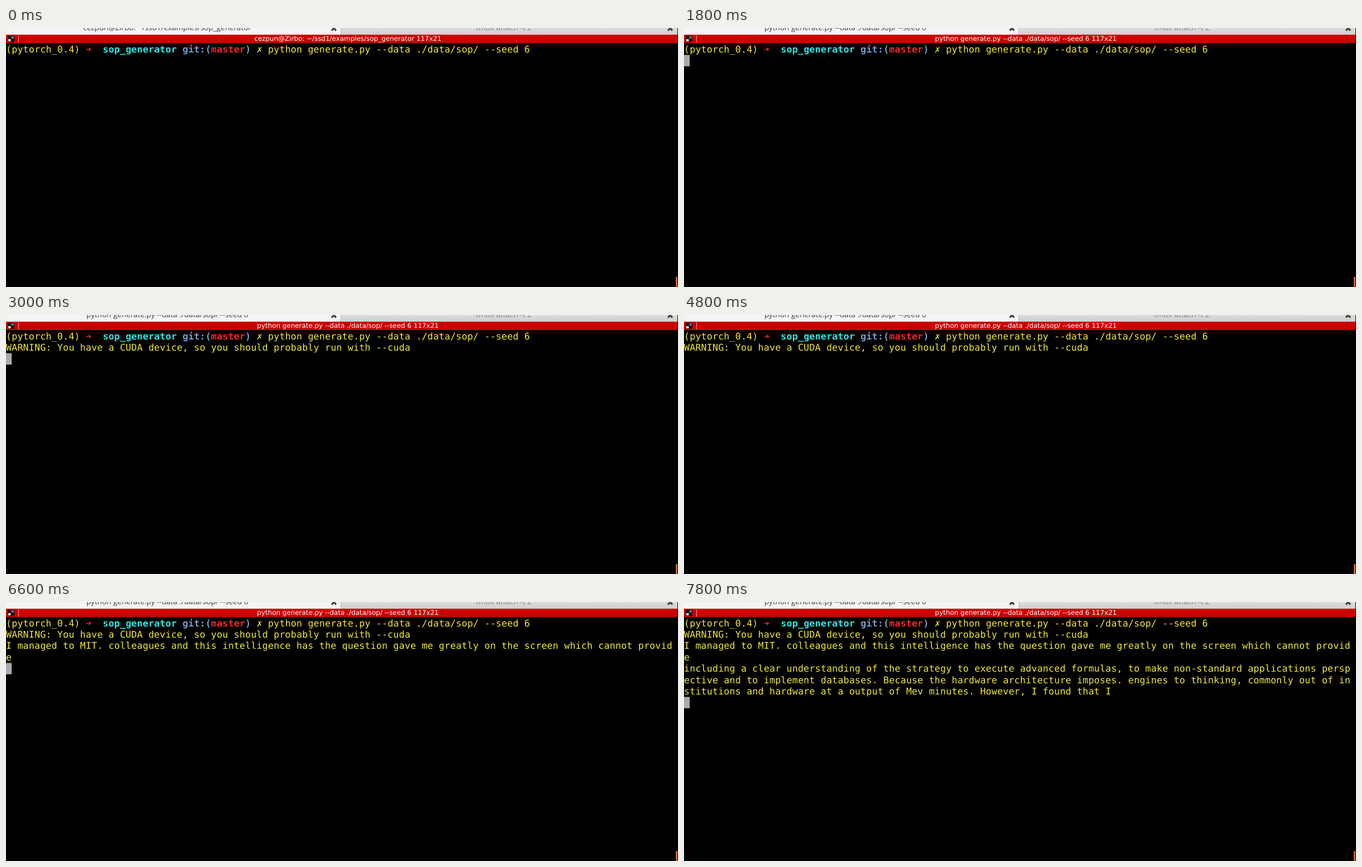
Recreate the animation shown at these times as an HTML page. Size 1203 by 465 pixels, loop 8 s.

```html
<!DOCTYPE html>
<html lang="en">
<head>
<meta charset="utf-8">
<title>Terminal session</title>
<style>
  html, body { margin: 0; width: 100%; height: 100%; overflow: hidden; background: #000; }
  svg { display: block; width: 1203px; height: 465px; }
  text { white-space: pre; text-rendering: geometricPrecision; }
  .ui { text-anchor: middle; }
  .tab { font-family: "Open Sans", sans-serif; font-size: 13.55px; }
  .title { font-family: "DejaVu Sans", sans-serif; font-size: 11.92px; fill: #fff; }
  .term {
    font-family: "DejaVu Sans Mono", monospace; font-size: 16.69px;
    letter-spacing: .149px; fill: #f0e83a;
  }
  .bold { font-weight: bold; }
</style>
</head>
<body>
<svg viewBox="0 0 1203 465" xmlns="http://www.w3.org/2000/svg">
  <defs>
    <linearGradient id="idle" x2="0" y2="1">
      <stop stop-color="#dcdcdc"/><stop offset="1" stop-color="#d0d0d0"/>
    </linearGradient>
    <path id="close" d="M-4-4 4 4M4-4-4 4" stroke="#444" stroke-width="3.4"/>
  </defs>
  <rect width="1203" height="465"/>

  <rect width="600" height="12" fill="#f5f4f4"/>
  <rect x="600" width="602" height="12" fill="url(#idle)"/>
  <rect x="599" width="1" height="12" fill="#b4b4b4"/>
  <text id="tab" class="ui tab" x="288.7" y="4" fill="#3c3c3c"></text>
  <text class="ui tab" x="891" y="4" fill="#858585">tmux attach -t 2</text>
  <use href="#close" x="587" y="0.5"/>
  <use href="#close" x="1189" y="0.5"/>

  <rect y="12" width="1202" height="15" fill="#c00"/>
  <rect x="3" y="14" width="12" height="11" fill="#1c1414"/>
  <rect x="9.5" y="15" width="4.5" height="4" fill="#2f7fa8"/>
  <rect x="4" y="20" width="4.5" height="4" fill="#e4e0e0"/>
  <rect x="22" y="13" width="1" height="13" fill="#eba0a0"/>
  <text id="title" class="ui title" x="612" y="23.2"></text>

  <g id="screen"></g>
  <rect id="cursor" width="10.2" height="20.35" fill="#aaa"/>
  <rect x="1199" y="447" width="3" height="18" fill="#d4643c"/>
</svg>
<script>
const LOOP = 8000, COL = 10.197, ROW = 20.35, TOP = 28, ASCENT = 15.76;
const $ = id => document.getElementById(id);
const COMMAND = 'python generate.py --data ./data/sop/ --seed 6';
const SHELL = 'cezpun@Zirbo: ~/ssd1/examples/sop_generator';

// Prompt pieces: column, text, colour, bold
const prompt = [
  [0, '(pytorch_0.4)'],
  [14, '➜', '#ef2929', true],
  [17, 'sop_generator', '#34e2e2', true],
  [31, 'git:(', '#729fcf', true],
  [36, 'master', '#ef2929', true],
  [42, ')', '#729fcf', true],
  [44, '✗'],
  [46, COMMAND]
];

// Printed output: time, first row, lines
const output = [
  [2200, 1, ['WARNING: You have a CUDA device, so you should probably run with --cuda']],
  [5400, 2, [
    'I managed to MIT. colleagues and this intelligence has the question gave me greatly on the screen which cannot provid',
    'e'
  ]],
  [6900, 4, [
    'including a clear understanding of the strategy to execute advanced formulas, to make non-standard applications persp',
    'ective and to implement databases. Because the hardware architecture imposes. engines to thinking, commonly out of in',
    'stitutions and hardware at a output of Mev minutes. However, I found that I'
  ]]
];

// Cursor positions: time, column, row
const moves = [[0, 92, 0], [1800, 0, 1], [2200, 0, 2], [5400, 0, 4], [6900, 0, 7]];
// Cursor visibility: time, shown
const blinks = [
  [0, 0], [300, 1], [900, 0], [1500, 1], [2300, 0], [3000, 1], [3500, 0],
  [4100, 1], [4800, 0], [5400, 1], [6200, 0], [6600, 1], [7300, 0], [7800, 1]
];

const latest = (list, t) => list.filter(item => item[0] <= t).pop();

function write(parent, col, row, string, fill, bold) {
  const el = document.createElementNS('http://www.w3.org/2000/svg', 'text');
  el.setAttribute('class', bold ? 'term bold' : 'term');
  el.setAttribute('x', col * COL);
  el.setAttribute('y', TOP + row * ROW + ASCENT);
  if (fill) el.style.fill = fill;
  el.textContent = string;
  parent.append(el);
}

function addGroup() {
  const group = document.createElementNS('http://www.w3.org/2000/svg', 'g');
  $('screen').append(group);
  return group;
}

const promptGroup = addGroup();
for (const [col, string, fill, bold] of prompt) write(promptGroup, col, 0, string, fill, bold);

const blocks = output.map(([time, row, lines]) => {
  const group = addGroup();
  lines.forEach((line, i) => write(group, 0, row + i, line));
  return { time, group };
});

function draw(t) {
  const label = t < 1800 ? SHELL : COMMAND;
  $('tab').textContent = label;
  $('title').textContent = label + ' 117x21';
  for (const { time, group } of blocks) group.style.display = t >= time ? '' : 'none';
  const [, col, row] = latest(moves, t);
  $('cursor').setAttribute('x', col * COL);
  $('cursor').setAttribute('y', TOP + row * ROW);
  $('cursor').style.display = latest(blinks, t)[1] ? '' : 'none';
}

const start = performance.now();
function tick() {
  draw((performance.now() - start) % LOOP);
  requestAnimationFrame(tick);
}
tick();
</script>
</body>
</html>
```
